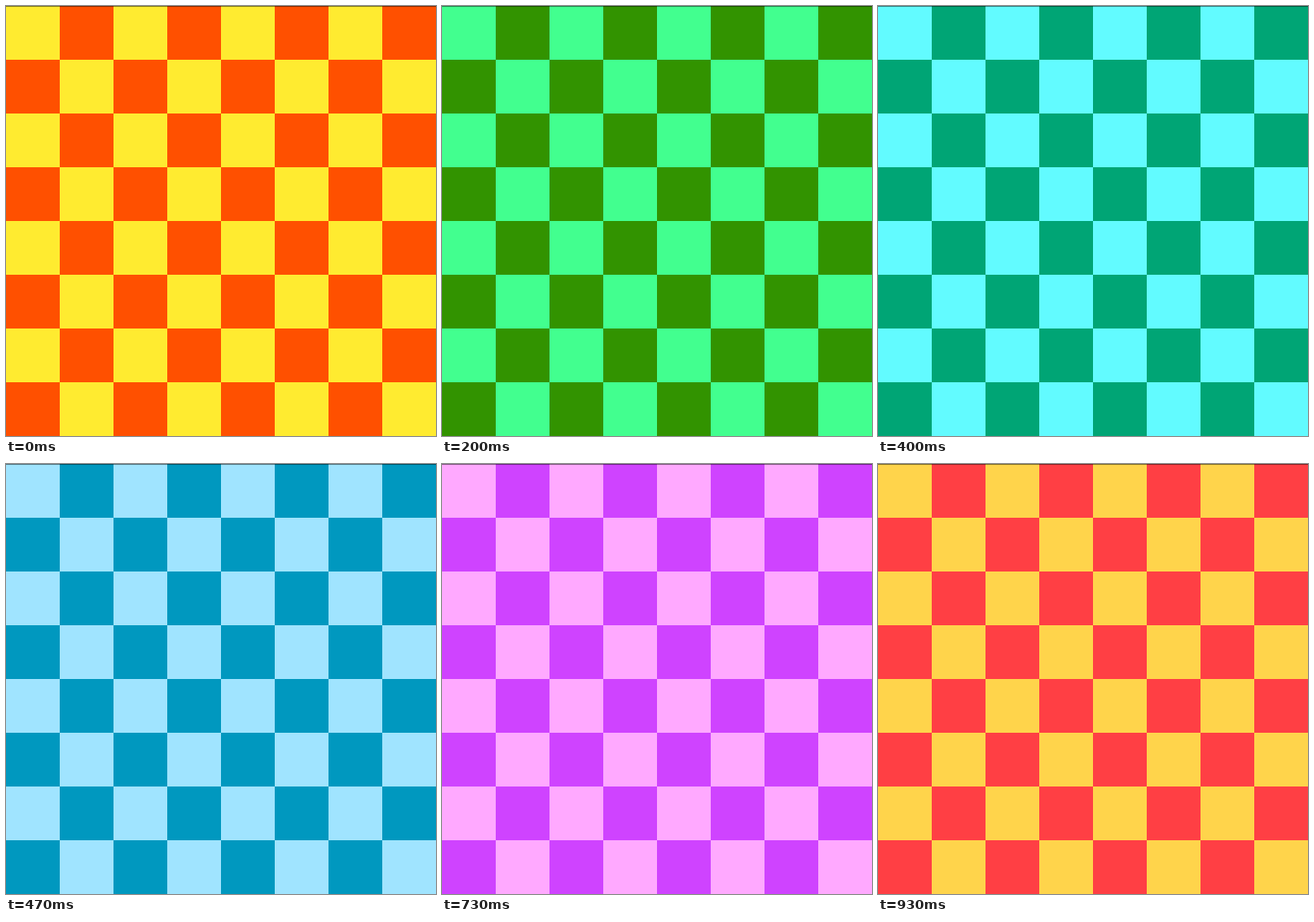
An HTML page for the animation above (0.99 s loop, 480 by 480 pixels).

```html
<!DOCTYPE html>
<html lang="en">
<head>
<meta charset="utf-8">
<title>Hue-cycling checkerboard</title>
<style>
  html, body { margin: 0; width: 100%; height: 100%; overflow: hidden; }
  svg { display: block; width: 100%; height: 100%; }
</style>
</head>
<body>
<svg viewBox="0 0 480 480" shape-rendering="crispEdges">
  <rect id="dark" width="480" height="480"/>
  <path id="light"/>
  <rect width="480" height="1" fill="#000" fill-opacity=".45"/>
</svg>
<script>
const LOOP = 990, STEPS = 15, CELL = 60, COUNT = 8;
const LIGHT = [255, 235, 48], DARK = [255, 80, 0];
const light = document.getElementById('light');
const dark = document.getElementById('dark');

// Step start times, rounded to hundredths of a second
const starts = Array.from({ length: STEPS }, (_, k) => Math.round(k * 20 / 3) * 10);

let cells = '';
for (let row = 0; row < COUNT; row++) {
  for (let col = row % 2; col < COUNT; col += 2) {
    cells += `M${col * CELL} ${row * CELL}h${CELL}v${CELL}h${-CELL}z`;
  }
}
light.setAttribute('d', cells);

// Hue rotation that keeps luminance, clipped to the RGB range
function rotateHue([r, g, b], degrees) {
  const a = degrees * Math.PI / 180, c = Math.cos(a), s = Math.sin(a);
  const luma = 0.213 * r + 0.715 * g + 0.072 * b;
  const rgb = [
    luma + c * (r - luma) + s * (-0.213 * r - 0.715 * g + 0.928 * b),
    luma + c * (g - luma) + s * (0.143 * r + 0.140 * g - 0.283 * b),
    luma + c * (b - luma) + s * (-0.787 * r + 0.715 * g + 0.072 * b)
  ];
  return `rgb(${rgb.map(v => Math.round(Math.min(255, Math.max(0, v)))).join(',')})`;
}

function draw(ms) {
  const t = ms % LOOP;
  const step = starts.filter(start => start <= t).length - 1;
  const hue = step * 360 / STEPS;
  light.setAttribute('fill', rotateHue(LIGHT, hue));
  dark.setAttribute('fill', rotateHue(DARK, hue));
}

const begin = performance.now();
function tick() {
  draw(performance.now() - begin);
  requestAnimationFrame(tick);
}
tick();
</script>
</body>
</html>
```
